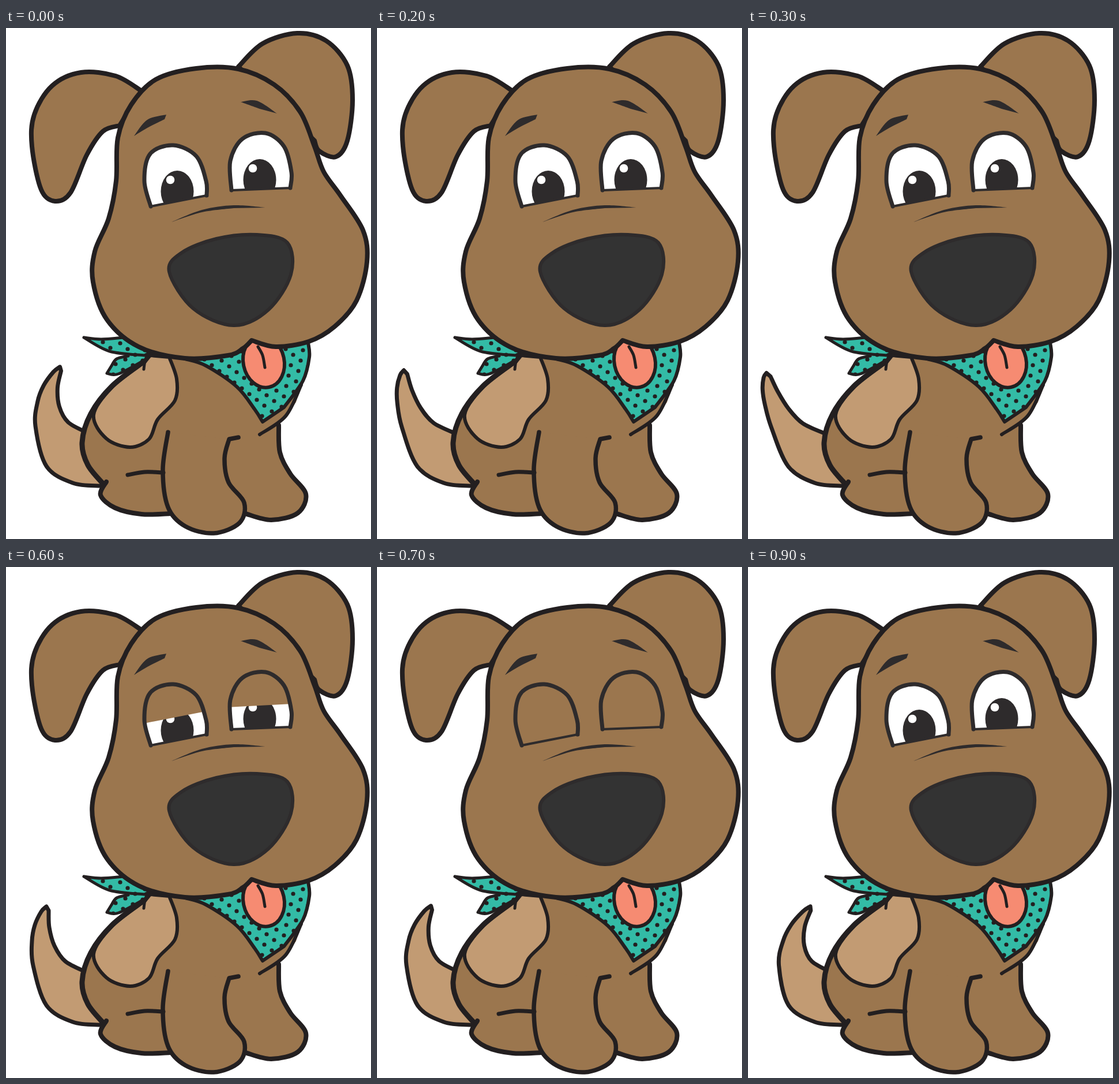
Animation, 633 px wide and 885 px high, one loop 1000 ms. Source, as an HTML page:

```html
<!DOCTYPE html>
<html lang="en">
<head>
<meta charset="utf-8">
<title>Puppy wagging and blinking</title>
<style>
  html, body { margin: 0; width: 100%; height: 100%; overflow: hidden; background: #fff; }
  svg { display: block; width: 633px; height: 885px; }
</style>
</head>
<body>
<svg id="dog" viewBox="0 0 633 885" fill="none" stroke-linecap="round" stroke-linejoin="round"></svg>
<script>
const INK = '#231f20', SOFT = '#2e2b2c', FUR = '#9b764e', TAN = '#c29b73',
      TEAL = '#33bba6', PINK = '#f68b72';

// Smooth curve through key points; "/" marks a corner, a trailing "o" a smooth loop.
function curve(text, warp = p => p) {
  const loop = text.endsWith('o');
  const runs = text.replace('o', '').split('/').map(run =>
    run.trim().split(/\s+/).map(p => warp(p.split(',').map(Number))));
  let d = '';
  for (const run of runs) {
    const n = run.length;
    const at = i => loop ? run[(i + n) % n] : run[Math.max(0, Math.min(n - 1, i))];
    d += (d ? 'L' : 'M') + run[0];
    for (let i = 0; i < (loop ? n : n - 1); i++) {
      const [a, b, c, e] = [at(i - 1), at(i), at(i + 1), at(i + 2)];
      const out = b.map((v, k) => (v + (c[k] - a[k]) / 6).toFixed(1));
      const into = c.map((v, k) => (v - (e[k] - b[k]) / 6).toFixed(1));
      d += `C${out} ${into} ${c}`;
    }
  }
  return d;
}

const fill = (pts, color) => `<path d="${curve(pts)}Z" fill="${color}"/>`;
const line = (pts, width = 8, color = INK) =>
  `<path d="${curve(pts)}" stroke="${color}" stroke-width="${width}"/>`;
const shape = (pts, color, width = 8, ink = INK) =>
  `<path d="${curve(pts)}Z" fill="${color}" stroke="${ink}" stroke-width="${width}"/>`;
const clip = (id, ...shapes) =>
  `<clipPath id="${id}">${shapes.map(s => `<path d="${curve(s)}Z"/>`).join('')}</clipPath>`;

const earL = '235,109 190,83 130,77 80,100 49,150 45,205 61,280 85,300 112,285 140,220 168,179 197,169';
const earR = '403,67 445,27 505,9 555,22 592,65 601,125 592,195 572,223 543,213 535,195';
const head = '426,541 468,552 525,543 570,517 608,472 626,405 619,350 580,290 551,249 535,205 510,145 465,98 403,71 330,70 260,89 217,133 194,190 191,265 178,330 154,387 151,440 175,505 230,552 310,572 385,567 411,555 426,541';
const back = '240,577 184,620 147,668 132,718 142,757 169,790';
const foot = '174,786 164,809 189,831 235,842 285,841';
const leg = '281,700 272,765 281,830 311,863 360,875 405,857 413,822 386,787 379,745 387,712';
const paw = '415,841 460,852 506,840 520,807 493,772 475,735 473,688';
const chest = '440,704 485,672 512,618';
const patch = '250,567 / 241,578 185,621 152,670 174,711 215,726 248,712 263,678 293,645 296,608 283,570';
const scarf = '310,573 347,585 400,621 431,660 445,682 / 482,657 515,611 526,570 524,545 / 420,530';
const knotA = '135,536 165,539 204,536 / 250,562 / 240,567 180,560 135,536';
const knotB = '212,568 192,573 183,585 / 175,598 195,599 242,574 / 245,566';
const nose = '283,422 305,389 365,365 435,358 488,372 494,427 455,488 395,515 325,486o';
const eyeL = '251,309 240,265 250,218 290,203 330,222 347,265 348,290';
const eyeR = '391,281 389,230 410,192 450,182 482,205 495,250 493,277';
const tail = '140,702 103,683 84,656 75,624 74,595 / 70,588 61,597 50,620 45,648 47,690 70,759 116,788 164,793';

// Polka dots on a slanted lattice
function dots() {
  let s = '';
  for (let i = -22; i < 8; i++)
    for (let j = -16; j < 8; j++) {
      const x = 469 + 17 * i - 4 * j, y = 628 - 8 * i + 18 * j;
      if (x > 140 && x < 530 && y > 530 && y < 680)
        s += `<circle cx="${x}" cy="${y}" r="3.6"/>`;
    }
  return s;
}
const dotted = id => `<g fill="${INK}" clip-path="url(#${id})">${dots()}</g>`;

// Eye with its pupil centre; the lid is a tilted block that slides down inside it
const eye = (id, pts, x, y, tilt) => `
  <g clip-path="url(#${id})">
    ${fill(pts, '#fff')}
    <ellipse cx="${x}" cy="${y}" rx="28.5" ry="36" fill="${SOFT}"/>
    <circle cx="${x - 12}" cy="${y - 20}" r="7.3" fill="#fff"/>
    <g transform="rotate(${tilt} ${x} ${y})">
      <rect class="lid" x="${x - 90}" y="${y - 266}" width="180" height="200" fill="${FUR}"/>
    </g>
  </g>
  <path d="${curve(pts)}Z" stroke="${SOFT}" stroke-width="4"/>
  ${line(pts, 7, SOFT)}`;

document.getElementById('dog').innerHTML = `
  <defs>
    ${clip('eyeL', eyeL)}${clip('eyeR', eyeR)}
    ${clip('scarf', scarf)}${clip('knot', knotA, knotB)}
  </defs>
  <path id="tail" fill="${TAN}" stroke="${INK}" stroke-width="7"/>
  ${fill(knotB, TEAL)}${fill(knotA, TEAL)}${dotted('knot')}
  ${line(knotB, 5)}${line(knotA, 5)}
  ${fill([back, foot, paw, '503,648 512,618', '400,560'].join('/'), FUR)}
  ${fill(leg, FUR)}
  ${shape(patch, TAN, 6)}
  ${line(back, 9)}${line(foot)}${line(paw)}
  ${line(leg + ' / 403,709', 7.5)}${line(chest, 6)}
  ${line('211,774 240,769 273,770', 7)}
  ${line('247,566 241,578 239,591', 5)}
  ${fill(scarf, TEAL)}${dotted('scarf')}${line(scarf, 6)}
  <ellipse cx="447" cy="578" rx="35.5" ry="45" transform="rotate(-12 447 578)"
    fill="${PINK}" stroke="${INK}" stroke-width="6"/>
  ${line('437,552 445,567 449,588', 5)}
  ${shape(earL, FUR)}${shape(earR, FUR)}${shape(head, FUR)}
  ${fill('222,187 245,159 278,150 / 275,158 245,173 222,187', SOFT)}
  ${fill('407,128 435,126 470,148 / 440,140 407,128', SOFT)}
  ${eye('eyeL', eyeL, 297, 283, -11)}
  ${eye('eyeR', eyeR, 440, 263, -3)}
  ${fill('287,336 340,315 395,307 451,311 / 395,312 340,319 287,336', SOFT)}
  ${shape(nose, '#333', 6, SOFT)}`;

const tailPath = document.getElementById('tail');
const lids = document.querySelectorAll('.lid');
const lidDrop = { 5: 0, 6: 43, 7: 110, 8: 43 };

// The sideways lean grows with height above the tail's root.
const lean = swing => ([x, y]) => {
  const h = Math.max(0, (790 - y) / 200) ** 2.5;
  return [x - 39 * swing * h, y + 5 * (swing + swing * swing) * h];
};

function draw() {
  const step = Math.floor(performance.now() / 100) % 10;
  const swing = Math.cos((step - 3.5) * Math.PI / 5);
  tailPath.setAttribute('d', curve(tail, lean(swing)));
  const drop = lidDrop[step] ?? -60;
  lids.forEach(lid => lid.setAttribute('transform', `translate(0 ${drop})`));
  requestAnimationFrame(draw);
}
draw();
</script>
</body>
</html>
```
